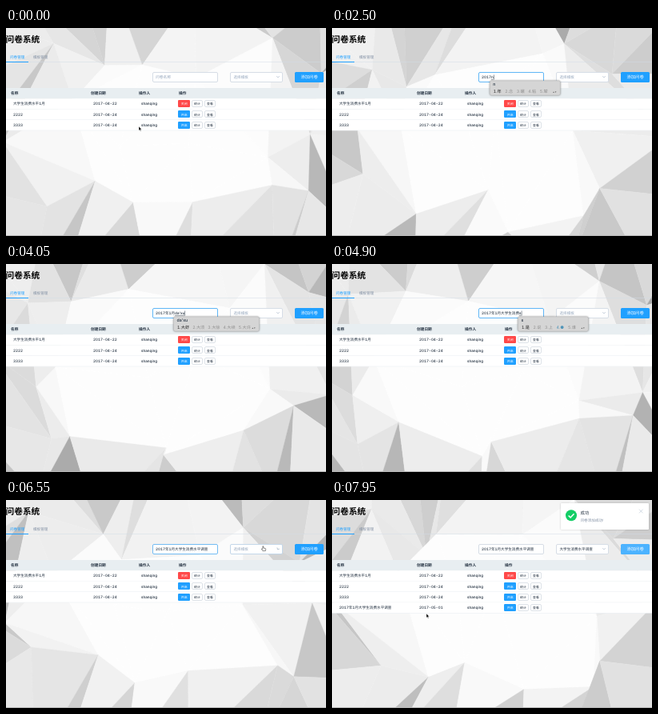
Animation, 400 px wide and 260 px high, one loop 8000 ms. Source, as an HTML page:

```html
<!DOCTYPE html>
<html>
<head>
<meta charset="utf-8">
<style>
  html, body { margin: 0; width: 100%; height: 100%; overflow: hidden; background: #fdfdfd; }
  svg { display: block; width: 400px; height: 260px; }
  text { font: 4.6px Inter, "Noto Sans CJK SC", "Noto Sans CJK", sans-serif; font-variant-numeric: tabular-nums; text-rendering: geometricPrecision; white-space: pre; }
</style>
</head>
<body>
<svg id="stage" viewBox="0 0 400 260"></svg>
<script>
const LOOP = 8000;
const BLUE = '#20a0ff', RED = '#ff4949', INK = '#1f2d3d', MUTED = '#97a8be', LINE = '#dfe6ec';
const IDLE = [214, 221, 230], FOCUS = [96, 182, 246];
const CHOICE = '大学生消费水平调查';
const stage = document.getElementById('stage');

function el(tag, attrs, parent = stage) {
  const node = document.createElementNS('http://www.w3.org/2000/svg', tag);
  set(node, attrs);
  return parent.appendChild(node);
}
function set(node, attrs) { for (const key in attrs) node.setAttribute(key, attrs[key]); }
const show = (node, on) => set(node, { visibility: on ? 'visible' : 'hidden' });
const rect = (x, y, width, height, fill, parent, more) =>
  el('rect', { x, y, width, height, fill, ...more }, parent);
const box = (x, y, w, h, stroke, parent) =>
  rect(x + 0.5, y + 0.5, w - 1, h - 1, '#fff', parent, { rx: 1.5, stroke });
function label(x, y, content, fill = INK, size = 4.6, parent = stage, weight = 500) {
  const node = el('text', { x, y, style: `fill:${fill};font-size:${size}px;font-weight:${weight}` }, parent);
  node.textContent = content;
  return node;
}
function floating(shadow) {
  const g = el('g', {});
  g.style.filter = `drop-shadow(0 .7px 1.2px ${shadow})`;
  return g;
}

const mix = (a, b, k) => a + (b - a) * k;
const mixColor = (a, b, k) => `rgb(${a.map((v, i) => Math.round(mix(v, b[i], k)))})`;
function smooth(t, from, to) {
  const k = Math.min(1, Math.max(0, (t - from) / (to - from)));
  return k * k * (3 - 2 * k);
}
let seed = 11;
const random = () => (seed = seed * 16807 % 2147483647) / 2147483647;

// Low-poly backdrop: a jittered mesh that sways, white in the middle and grey at the rim.
const COLS = 8, ROWS = 5;
const vertices = Array.from({ length: COLS * ROWS }, (_, i) => ({
  x: mix(-50, 450, i % COLS / (COLS - 1)) + 44 * (random() - 0.5),
  y: mix(-50, 310, Math.floor(i / COLS) / (ROWS - 1)) + 44 * (random() - 0.5),
  phase: random() * 2 * Math.PI,
  speed: mix(0.7, 1.5, random()) / 1000
}));
const facets = [];
function addFacet(...corners) {
  const center = axis => corners.reduce((sum, c) => sum + vertices[c][axis], 0) / 3;
  const rim = smooth(Math.hypot((center('x') - 200) / 200, (center('y') - 130) / 170), 0.5, 1.1);
  facets.push({ corners, rim, depth: random() ** 1.5, phase: random() * 6, node: el('polygon', {}) });
}
for (let row = 0; row < ROWS - 1; row++) {
  for (let col = 0; col < COLS - 1; col++) {
    const a = row * COLS + col, b = a + 1, c = a + COLS, d = c + 1;
    if (random() < 0.5) { addFacet(a, b, c); addFacet(b, d, c); }
    else { addFacet(a, b, d); addFacet(a, d, c); }
  }
}
function drawBackdrop(t) {
  const points = vertices.map(({ x, y, phase, speed }) => {
    const angle = phase + t * speed;
    return `${(x + 22 * Math.cos(angle)).toFixed(2)},${(y + 22 * Math.sin(angle)).toFixed(2)}`;
  });
  for (const { node, corners, rim, depth, phase } of facets) {
    const light = 0.75 + 0.25 * Math.sin(phase + t / 900);
    const grey = Math.round(253 - rim * (8 + 80 * depth * light));
    const fill = `rgb(${grey},${grey},${grey})`;
    set(node, { points: corners.map(c => points[c]).join(' '), fill, stroke: fill, 'stroke-width': 0.3 });
  }
}

// Header and form
rect(0, 259, 400, 1, '#b5b5b5');
label(-0.5, 18, '问卷系统', '#000', 10.7, stage, 700);
rect(0, 42, 400, 0.5, '#d1dbe5');
rect(0, 42, 28, 1, BLUE);
label(5, 37.8, '问卷管理', BLUE);
label(34, 37.8, '模板管理', '#8391a5');

const nameBox = box(183, 55, 82, 13);
const nameHint = label(187, 63.2, '问卷名称', MUTED, 4.8);
const nameText = label(187, 63.2, '');
const compLine = rect(187, 64.2, 0, 0.4, INK);
const caret = rect(187, 58.5, 0.5, 6, INK);

const selectBox = box(280, 55, 66, 13);
const selectText = label(284.5, 63.2, '', MUTED);
const chevron = el('path', { d: 'M-1.7-.8L0 .9L1.7-.8', fill: 'none', stroke: MUTED, 'stroke-width': 0.6 });
const addButton = rect(361, 55, 36, 13, BLUE, stage, { rx: 1.5 });
label(368.5, 63.2, '添加问卷', '#fff', 5.3);

// Table
rect(0, 75, 400, 13.3, '#e8eef1');
[[6, '名称'], [106, '创建日期'], [166, '操作人'], [216, '操作']]
  .forEach(([x, head]) => label(x, 83.3, head, INK, 4.7, stage, 600));

function addRow(index, name, date, closing) {
  const g = el('g', {}), y = 88.3 + index * 13.3, base = y + 8.1;
  rect(0, y, 400, 13.3, '#fff', g);
  rect(0, y + 12.9, 400, 0.4, LINE, g);
  [[9, name], [109, date], [169, 'shanqing']].forEach(([x, value]) => label(x, base, value, INK, 4.6, g));
  const top = Math.round(y + 1.8);
  rect(215, top, 15, 9, closing ? RED : BLUE, g, { rx: 1.2 });
  label(218.8, base, closing ? '关闭' : '开启', '#fff', 3.9, g);
  [[232, '统计'], [248, '查看']].forEach(([x, caption]) => {
    box(x, top, 14, 9, '#dde2e8', g);
    label(x + 3.1, base, caption, INK, 3.9, g);
  });
  return g;
}
addRow(0, '大学生消费水平1月', '2017-04-22', true);
addRow(1, '2222', '2017-04-24');
addRow(2, '3333', '2017-04-24');
const newRow = addRow(3, '2017年1月' + CHOICE, '2017-05-01');

// Dropdown
const menu = floating('#0003');
box(280, 70, 66, 18, '#d1dbe5', menu);
rect(281, 73, 64, 12, '#e4e8f1', menu);
label(284.5, 80.9, CHOICE, '#48576a', 4.6, menu);

// Input method panel
const ime = floating('#0006');
const imeBox = rect(0, 66, 107, 18, '#d5d5d5', ime, { rx: 2, stroke: '#b2b2b2', 'stroke-width': 0.4 });
const imeText = label(4, 72.4, '', INK, 5.2, ime);
const choices = Array.from({ length: 5 }, (_, i) => label(0, 80.8, '', i ? '#909090' : '#222', 5.2, ime, 400));
const imeArrows = label(0, 80.5, '▴ ▾', '#555', 3.2, ime);

// Notification
const notice = floating('#0003');
rect(286, 4, 110, 33, '#fff', notice, { rx: 1 });
el('circle', { cx: 299, cy: 19.3, r: 7, fill: '#13ce66' }, notice);
el('path', { d: 'M295.6 19.5l2.5 2.4l4.4-4.7', fill: 'none', stroke: '#fff', 'stroke-width': 1.5 }, notice);
label(310.5, 17.6, '成功', INK, 5.4, notice);
label(310.5, 27, '问卷添加成功!', '#8391a5', 4.6, notice, 400);
el('path', { d: 'M384 11.7l4.6 4.6m0-4.6l-4.6 4.6', stroke: '#bfcbd9', 'stroke-width': 0.7 }, notice);

// Pointers
const arrow = el('path', { d: 'M0 0V5.2L1.2 4.1L2 5.9L2.8 5.5L2 3.8H3.6Z', fill: '#000', stroke: '#fff', 'stroke-width': 0.4 });
const hand = el('path', { d: 'M0-2.5Q.8-3 1 0L3.4.6Q4 1 3.4 3.6H-.2L-1.6 1.1Q-1.2.4-.2 1.3Z', fill: '#fff', stroke: '#222', 'stroke-width': 0.5 });

// Phrases: start, result, and for composed ones the keystrokes and candidates.
const KEY_TIME = 140, PANEL_DELAY = 110;
const phrases = [
  ...[...'2017'].map((digit, i) => [1300 + i * 260, digit]),
  [2380, '年', 'n ni nia nian', '年 念 碾 粘 辇'],
  [3030, '1'],
  [3120, '月', 'y yu yue', '月 越 约 阅 悦'],
  [3580, '大学生', "d da da'x da'xu da'xue da'xue's", '大虾 大须 大徐 大续 大许'],
  [4440, '消费', "x xiao'f", '消费 小费 校费 小肥 小飞'],
  [4770, '水平', "s sh shui shui'p", '是 说 上 ● 谁'],
  [5400, '调查', "d diao diao'c diao'cha", '调查 吊查 掉茶 调茶 叼茶']
];

function typedAt(t) {
  let text = '';
  for (const [start, result, keys = '', words] of phrases) {
    if (t < start) break;
    const strokes = keys ? keys.split(' ') : [];
    const comp = strokes[Math.floor((t - start) / KEY_TIME)];
    if (comp) return { text, comp, words: t - start > PANEL_DELAY && words };
    text += result;
  }
  return { text, comp: '' };
}

function textEnd(content) {
  nameText.textContent = content;
  return 187 + (content ? nameText.getComputedTextLength() : 0);
}

function drawTyping(t) {
  const { text, comp, words } = typedAt(t);
  const start = textEnd(text), end = textEnd(text + comp);
  const focus = smooth(t, 900, 1100) - smooth(t, 6500, 6700);
  set(nameBox, { stroke: mixColor(IDLE, FOCUS, focus) });
  show(nameHint, !text && !comp);
  set(compLine, { x: start, width: end - start });
  set(caret, { x: end + 0.3 });
  show(caret, t > 950 && t < 6500 && (t < 6000 || t % 1000 < 500));

  show(ime, words);
  if (!words) return;
  const list = words.split(' '), wide = list[0].length > 1;
  const width = wide ? 107 : 88;
  set(ime, { transform: `translate(${start - 1.6} 0)` });
  set(imeBox, { width });
  set(imeArrows, { x: width - 9 });
  imeText.textContent = comp;
  choices.forEach((node, i) => {
    node.textContent = `${i + 1}.${list[i]}`;
    node.style.fill = list[i] === '●' ? '#4f94b8' : i ? '#909090' : '#222';
    set(node, { x: 4.5 + i * (wide ? 19.2 : 14.5) });
  });
}

// Each move: leave, arrive, destination.
const moves = [[300, 850, 225, 61], [6050, 6450, 321, 60], [6700, 6950, 318, 79],
  [7080, 7330, 379, 62], [7480, 7900, 118, 142]];

function drawPointer(t) {
  let x = 166, y = 123;
  for (const [leave, arrive, toX, toY] of moves) {
    const k = smooth(t, leave, arrive);
    x = mix(x, toX, k);
    y = mix(y, toY, k);
  }
  const pointing = t > 6350 && t < 7540, visible = t < 1250 || t > 6000;
  for (const node of [arrow, hand]) set(node, { transform: `translate(${x} ${y})` });
  show(arrow, visible && !pointing);
  show(hand, visible && pointing);
}

function draw(t) {
  drawBackdrop(t);
  drawTyping(t);
  const chosen = t >= 7070;
  const open = smooth(t, 6500, 6700) - smooth(t, 7070, 7270);
  set(selectBox, { stroke: mixColor(IDLE, FOCUS, open) });
  set(chevron, { transform: `translate(340 61) rotate(${180 * open})` });
  selectText.textContent = chosen ? CHOICE : '选择模板';
  selectText.style.fill = chosen ? INK : MUTED;
  show(menu, t >= 6600 && t < 7120);
  set(addButton, { fill: t > 7300 ? '#4db3ff' : BLUE });
  show(newRow, t >= 7550);
  show(notice, t >= 7550);
  set(notice, { transform: `translate(${118 * (1 - smooth(t, 7550, 7850))} 0)` });
  drawPointer(t);
}

const began = performance.now();
function tick() {
  draw((performance.now() - began) % LOOP);
  requestAnimationFrame(tick);
}
tick();
</script>
</body>
</html>
```
